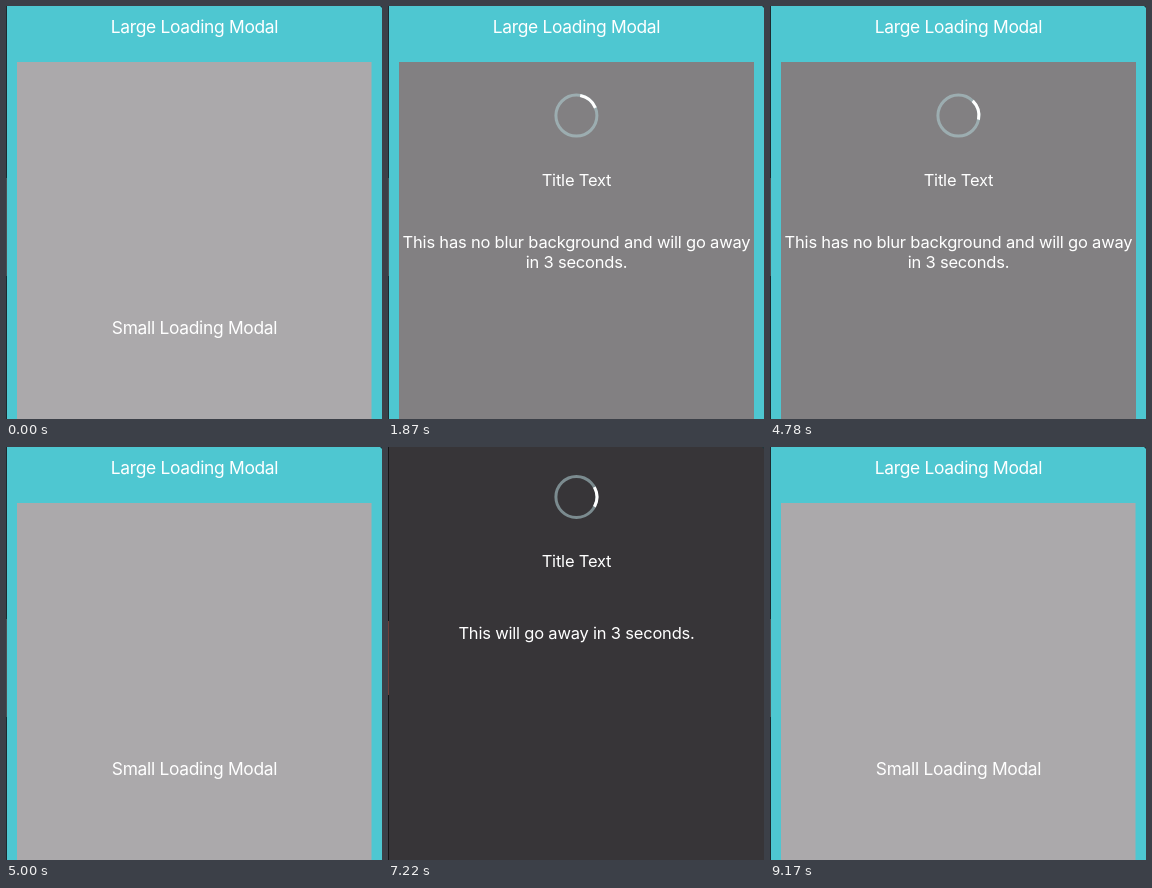
These frames come from a looping animation (376x413 px, 9270 ms). An HTML page:

```html
<!DOCTYPE html>
<html lang="en">
<head>
<meta charset="utf-8">
<title>Loading modals</title>
<style>
  html, body { margin: 0; width: 100%; height: 100%; overflow: hidden; background: #4ec7d1; }
  svg { display: block; width: 376px; height: 413px; }
  text { fill: #fff; text-anchor: middle; font: 16.5px Inter, Roboto, sans-serif; letter-spacing: -.2px; }
  .button { font-size: 17.4px; letter-spacing: -.3px; }
  .spinner circle { fill: none; stroke-width: 3; }
  .track { stroke: rgba(179, 210, 215, .55); }
  .arc { stroke: #fff; stroke-dasharray: 57 303; }
</style>
</head>
<body>
<svg viewBox="0 0 376 413">
  <rect width="376" height="413" fill="#4ec7d1"/>
  <rect x="11" y="56" width="354.5" height="357" fill="#aba9ab"/>
  <text class="button" x="188.5" y="27">Large Loading Modal</text>
  <text class="button" x="188.5" y="328">Small Loading Modal</text>
  <rect width="1" height="413" fill="#1d2b30"/>
  <rect y="172" width="1" height="98" fill="#4a5154"/>

  <g id="small">
    <rect x="11" y="56" width="355" height="357" fill="#828082"/>
    <g class="spinner" transform="translate(188.4 109.6)">
      <circle class="track" r="20.5"/>
      <circle class="arc" r="20.5" pathLength="360"/>
    </g>
    <text x="188.5" y="180">Title Text</text>
    <text x="188.5" y="242">This has no blur background and will go away</text>
    <text x="188.5" y="262">in 3 seconds.</text>
  </g>

  <g id="large">
    <rect width="376" height="413" fill="#373538"/>
    <rect width="1" height="413" fill="#161517"/>
    <rect y="174" width="1" height="74" fill="#6e3f3a"/>
    <g class="spinner" transform="translate(188.4 50)">
      <circle class="track" r="20.5"/>
      <circle class="arc" r="20.5" pathLength="360"/>
    </g>
    <text x="188.5" y="120">Title Text</text>
    <text x="188.5" y="192">This will go away in 3 seconds.</text>
  </g>

  <path d="M374 0h2v2z" fill="#20383d"/>
</svg>
<script>
  const LOOP = 9270, TURN = 1390;
  const modals = [
    { id: "small", show: 1780, spin: 1830, hide: 5000 },
    { id: "large", show: 5570, spin: 5595, hide: 8780 }
  ];
  for (const m of modals) {
    m.node = document.getElementById(m.id);
    m.arc = m.node.querySelector(".arc");
  }

  function draw(t) {
    for (const { node, arc, show, spin, hide } of modals) {
      node.style.display = t >= show && t < hide ? "" : "none";
      const angle = Math.max(0, t - spin) / TURN * 360;
      arc.setAttribute("transform", `rotate(${angle - 90})`);
    }
  }

  const start = performance.now();
  function tick() {
    draw((performance.now() - start) % LOOP);
    requestAnimationFrame(tick);
  }
  tick();
</script>
</body>
</html>
```
